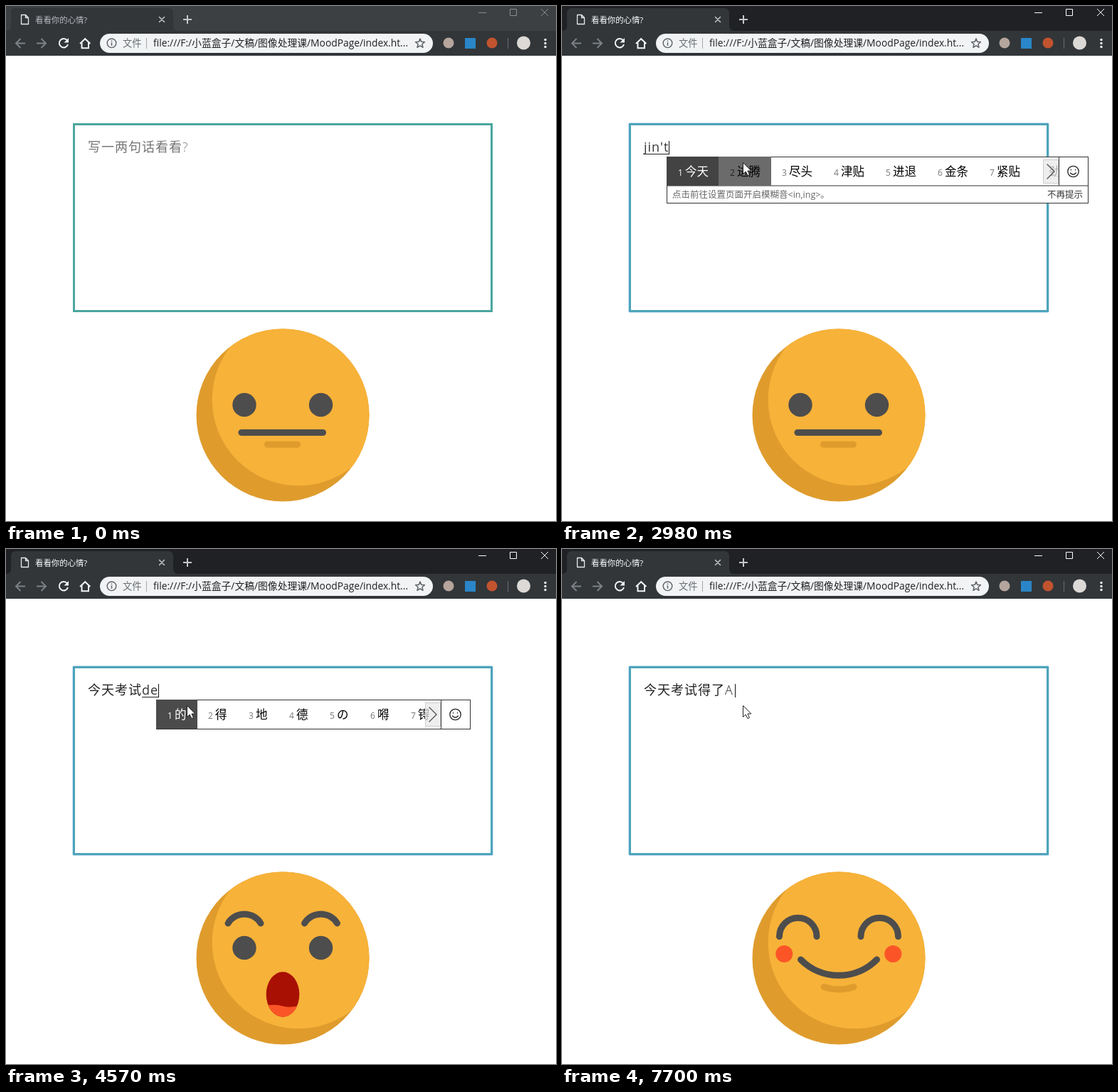
An HTML page for the animation above (8000 ms loop, 773x725 px).

```html
<!DOCTYPE html>
<html lang="zh-CN">
<head>
<meta charset="utf-8">
<title>看看你的心情?</title>
<style>
html, body { margin: 0; width: 100%; height: 100%; overflow: hidden; background: #fff; }
svg { display: block; width: 100%; height: 100%; }
text { font-family: "Open Sans", "Noto Sans CJK SC", "Noto Sans CJK", sans-serif; white-space: pre; }
.line { fill: none; stroke-linecap: round; stroke-linejoin: round; }
.ink { stroke: #4d4d4d; stroke-width: 9; }
.shade { stroke: #df9c2d; stroke-width: 9; }
.entry { font-size: 18px; letter-spacing: 1px; }
.cjk { font-weight: 300; }
.icon { stroke: #f1f3f4; stroke-width: 2; stroke-linecap: butt; stroke-linejoin: miter; }
.dim { stroke: #7d8185; }
#strip { fill: #3c4043; }
#title { fill: #b9bcc0; }
#controls { stroke: #8b8e91; }
.active #strip { fill: #202124; }
.active #title { fill: #fff; }
.active #controls { stroke: #fff; }
#field { fill: #fff; stroke: #4ba69f; stroke-width: 3; }
#ring { fill: none; stroke: #4d9fd0; stroke-width: 1; opacity: 0; }
.active #field { stroke: #4ea5b8; }
.active #ring { opacity: .6; }
</style>
</head>
<body>
<svg id="stage" viewBox="0 0 773 725" preserveAspectRatio="none">
  <defs>
    <clipPath id="disc"><circle cx="389" cy="576" r="121.5"/></clipPath>
    <clipPath id="lips"><ellipse cx="389" cy="627" rx="23.3" ry="31.7"/></clipPath>
    <clipPath id="listClip"><rect id="listBox" y="212" height="41"/></clipPath>
    <g id="eyes" fill="#4d4d4d"><circle cx="335" cy="561.5" r="16.7"/><circle cx="442.5" cy="561.5" r="16.7"/></g>
  </defs>

  <g id="chrome">
    <rect id="strip" width="773" height="36"/>
    <path d="M0 35q7 0 7-7V10q0-7 7-7H228q7 0 7 7V28q0 7 7 7H773V70H0Z" fill="#323639"/>
    <path class="line" d="M21.5 12.5h6l4 4v9h-10ZM27.5 12.5v4h4" stroke="#e8eaed" stroke-width="1.3"/>
    <text id="title" x="41" y="23.5" font-size="11.4">看看你的心情?</text>
    <path class="line" d="M215.500 15.500l7 7m0-7l-7 7" stroke="#c4c7ca" stroke-width="1.5"/>
    <path class="line icon" d="M249 19h12M255 13v12" style="stroke:#c4c7ca"/>
    <path id="controls" fill="none" d="M664 9.500h11M708.500 4.500h9v9h-9ZM752 4l10 10m0-10l-10 10"/>

    <path class="line icon dim" d="M27 52.500H14M20.500 46l-6.500 6.500 6.500 6.500M43 52.500h13M49.500 46l6.500 6.500-6.500 6.500"/>
    <path class="line icon" d="M86 48.500a6.200 6.200 0 1 0 1 5.500"/>
    <path d="M88 45v6.500h-6.500Z" fill="#f1f3f4"/>
    <path class="line icon" d="M104 53l7.200-6.800 7.200 6.800M106.500 51.500v7.700h9.500v-7.700"/>

    <rect x="132" y="39" width="468" height="27" rx="13.5" fill="#f1f3f4"/>
    <circle cx="148.500" cy="52.300" r="6.300" fill="none" stroke="#5f6368" stroke-width="1.400"/>
    <path d="M148.500 51.300v4.500M148.500 48.500v1.600" stroke="#5f6368" stroke-width="1.500"/>
    <text x="164" y="57" font-size="13.3" fill="#6a6e73">文件</text>
    <rect x="197" y="45" width="1" height="15" fill="#a5a8ac"/>
    <text x="207" y="57" font-size="13.8" fill="#202124">file:///F:/小蓝盒子/文稿/图像处理课/MoodPage/index.ht...</text>
    <path class="line" id="star" stroke="#5f6368" stroke-width="1.500"/>

    <circle cx="622" cy="52" r="7.500" fill="#b5a59c"/>
    <rect x="645" y="45" width="15" height="15" fill="#2a86c8"/>
    <circle cx="683" cy="52" r="7.500" fill="#c2532f"/>
    <rect x="705" y="45" width="1" height="15" fill="#6b6f73"/>
    <circle cx="727.500" cy="52" r="9.500" fill="#dcd9d6"/>
    <g fill="#f1f3f4"><circle cx="758" cy="47.500" r="1.700"/><circle cx="758" cy="52.500" r="1.700"/><circle cx="758" cy="57.500" r="1.700"/></g>
  </g>

  <rect id="field" x="95.500" y="166.500" width="587" height="263"/>
  <rect id="ring" x="94" y="165" width="590" height="266" rx="1.500"/>

  <circle cx="389" cy="576" r="121.500" fill="#df9c2d"/>
  <circle cx="411" cy="554" r="121.300" fill="#f7b239" clip-path="url(#disc)"/>

  <g class="face" id="neutral">
    <use href="#eyes"/>
    <path class="line ink" d="M331 600.500h114.500"/>
    <path class="line shade" d="M367.500 617.300h42"/>
  </g>
  <g class="face" id="worried">
    <use href="#eyes" y="-10.500"/>
    <path class="line ink" id="wave"/>
  </g>
  <g class="face" id="amazed">
    <use href="#eyes"/>
    <path class="line ink" d="M312 527a26.800 26.800 0 0 1 46 0M419.500 527a26.800 26.800 0 0 1 46 0"/>
    <g clip-path="url(#lips)">
      <rect x="360" y="590" width="60" height="70" fill="#a81004"/>
      <path d="M360 644Q378 640 389 643.500T420 641V662H360Z" fill="#fb5527"/>
    </g>
  </g>
  <g class="face" id="pleased">
    <use href="#eyes"/>
    <path class="line ink" d="M335 602a75.300 75.300 0 0 0 107.500 0"/>
  </g>
  <g class="face" id="happy">
    <path class="line ink" d="M305.500 545.500a26.200 26.200 0 0 1 52.500 0M420 545.500a26.200 26.200 0 0 1 52.500 0"/>
    <g fill="#fb5527"><circle cx="312.300" cy="570" r="12"/><circle cx="465.300" cy="570" r="12"/></g>
    <path class="line ink" d="M335.500 578a75.300 75.300 0 0 0 107 0"/>
    <path class="line shade" d="M368 616.500a65 65 0 0 0 42 0"/>
  </g>

  <text id="hint" class="entry cjk" x="115" y="205" fill="#757575">写一两句话看看?</text>
  <text id="done" class="entry cjk" x="115" y="205" fill="#222"></text>
  <text id="typing" class="entry" y="205" fill="#333"></text>
  <rect id="under" y="208" height="1" fill="#222"/>
  <rect id="caret" y="190" width="1" height="19" fill="#111"/>
  <g id="popup"></g>
  <path id="arrow" d="M.5.500V16.500l3.700-3.400 2.700 5.500 2.600-1.200-2.600-5.400h4.900Z" fill="#fff" stroke="#222"/>
  <path id="beam" d="M-3-7.500h2.500l.5.500.5-.5h2.500M-3 7.500h2.500l.5-.5.5.5h2.500M0-7V7" fill="none" stroke="#222"/>
</svg>
<script>
const $ = id => document.getElementById(id);
const LOOP = 8000, CLICK = 900, LEFT = 115, PITCH = 19, POINTER_X = 256;

// time, committed text, composition, caret x, candidates, popup width, tip row
const typingSteps = [
  [0, '', '', 116],
  [2380, '', 'j', 121],
  [2470, '', 'ji', 127, '几 及 级 即 机 记 急', 442],
  [2640, '', 'jin', 138, '今 进 金 仅 近 尽 紧 劲 斤', 593, true],
  [2880, '', "jin't", 150, '今天 进腾 尽头 津贴 进退 金条 紧贴 劲头', 593, true],
  [3220, '今天', '', 153],
  [3380, '今天', 'k', 163, '看 可 开 快 靠 卡 口', 442],
  [3560, '今天', 'ka', 175, '卡 咖 喀 咔 佧 咯 胩', 442],
  [3660, '今天', 'kao', 187, '考 靠 烤 铐 拷 犒 尻', 442],
  [3810, '今天', "kao's", 202, '考试 考数 考生 考上 靠山 烤熟 犒赏', 555],
  [4220, '今天考试', '', 191],
  [4470, '今天考试', 'd', 203, '的 大 到 都 对 点 等', 442],
  [4570, '今天考试', 'de', 214, '的 得 地 德 の 嘚 锝', 442],
  [5050, '今天考试得', '', 210],
  [5220, '今天考试得', 'l', 216, '了 来 里 啦 老 两 拉', 442],
  [5480, '今天考试得了', '', 229],
  [5970, '今天考试得了', 'A', 243],
  [6050, '今天考试得了', 'A', 243, 'A', 85],
  [6460, '今天考试得了A', '', 243]
];
const faceSteps = [[0, 'neutral'], [3470, 'worried'], [4470, 'amazed'], [6710, 'pleased'], [7700, 'happy']];
const caretOff = [[0, CLICK], [1640, 2220], [7040, 7610]];

const at = (steps, t) => steps.findLast(s => s[0] <= t);
const show = (el, on) => el.setAttribute('visibility', on ? 'visible' : 'hidden');
const label = (x, y, size, fill, s) => `<text x="${x}" y="${y}" font-size="${size}" fill="${fill}">${s}</text>`;
const box = (x, y, w, h, fill, more = '') => `<rect x="${x}" y="${y}" width="${w}" height="${h}" fill="${fill}" ${more}/>`;

function popupMarkup(caretX, words, width, tip) {
  const x = caretX - 3, right = x + width, y = 212, edge = 'stroke="#333"';
  const list = words.split(' ');
  const single = list.length === 1;
  const step = single ? 43 : list[0].length * 16 + 41;
  const hovered = Math.floor((POINTER_X - x) / step);
  $('listBox').setAttribute('x', x);
  $('listBox').setAttribute('width', width - 42);
  let out = box(x + .5, y + .5, width - 1, 41, '#fff', edge);
  if (tip) {
    out += box(x + .5, 253, width - 1, 24.5, '#fff', edge)
      + label(x + 8, 269.5, 12.5, '#666', '点击前往设置页面开启模糊音&lt;in,ing&gt;。')
      + label(right - 58, 269.5, 12.5, '#333', '不再提示');
  }
  out += '<g clip-path="url(#listClip)">';
  list.forEach((word, i) => {
    const left = x + i * step, first = i === 0;
    if (first || i === hovered)
      out += box(left, y, step + 1, 41, first ? (hovered ? '#434343' : '#4b4b4b') : '#6b6b6b');
    const numberInk = first ? '#fff' : i === hovered ? '#222' : '#777';
    if (i < 7 || step < 60) out += label(left + 16, 239, 12, numberInk, i + 1);
    out += label(left + 26, 239, 16.5, first ? '#fff' : '#000', word);
  });
  out += '</g>';
  if (!single) {
    out += box(right - 63.5, 216.5, 21, 33, '#e8e8e8', 'fill-opacity=".75" stroke="#ccc"')
      + `<path class="line" d="M${right - 58} 223l10 10-10 10" stroke="#555" stroke-width="1.4"/>`;
  }
  const cx = right - 21.5;
  return out + box(right - 42, y, 1, 41, '#333')
    + `<g class="line" stroke="#222" stroke-width="1.3"><circle cx="${cx}" cy="233" r="7.7"/>`
    + `<path d="M${cx - 4} 235q4 4.500 8 0M${cx - 3} 230.500v.4M${cx + 3} 230.500v.4"/></g>`;
}

let lastStep;
function drawTyping(step) {
  if (step === lastStep) return;
  lastStep = step;
  const [, done, typing, caretX, words, width, tip] = step;
  const start = LEFT + PITCH * done.length;
  show($('hint'), !done && !typing);
  $('done').textContent = done;
  $('typing').textContent = typing;
  $('typing').setAttribute('x', start);
  $('under').setAttribute('x', start);
  $('under').setAttribute('width', typing ? caretX - start : 0);
  $('caret').setAttribute('x', caretX);
  $('popup').innerHTML = words ? popupMarkup(caretX, words, width, tip) : '';
}

function drawPointer(t) {
  const p = Math.min(1, Math.max(0, (t - 400) / 450));
  const rest = (1 - p) ** 2;
  const x = POINTER_X + 144 * rest, y = 221 + 504 * rest;
  const overField = y < 431 && t < 2470;
  show($('beam'), t >= 400 && overField);
  show($('arrow'), t >= 400 && !overField);
  $('beam').setAttribute('transform', `translate(${Math.round(x) + .5} ${Math.round(y)})`);
  $('arrow').setAttribute('transform', `translate(${Math.round(x) - 2} ${Math.round(y) - 1})`);
}

function draw(now) {
  const t = now % LOOP;
  $('stage').classList.toggle('active', t >= CLICK);
  const face = at(faceSteps, t)[1];
  document.querySelectorAll('.face').forEach(g => show(g, g.id === face));
  drawTyping(at(typingSteps, t));
  show($('caret'), !caretOff.some(([a, b]) => t >= a && t < b));
  drawPointer(t);
}

const starPoint = (_, i) => {
  const a = i * Math.PI / 5, r = i % 2 ? 3 : 6.8;
  return `${582 + r * Math.sin(a)} ${52.8 - r * Math.cos(a)}`;
};
$('star').setAttribute('d', 'M' + Array.from({ length: 10 }, starPoint).join('L') + 'Z');
$('wave').setAttribute('d', 'M320 621' + 'c13 0 11-12.500 24.300-12.500s11 12.500 24.300 12.500'.repeat(3));

let origin;
function tick(now) {
  origin ??= now;
  draw(now - origin);
  requestAnimationFrame(tick);
}
draw(0);
requestAnimationFrame(tick);
</script>
</body>
</html>
```
